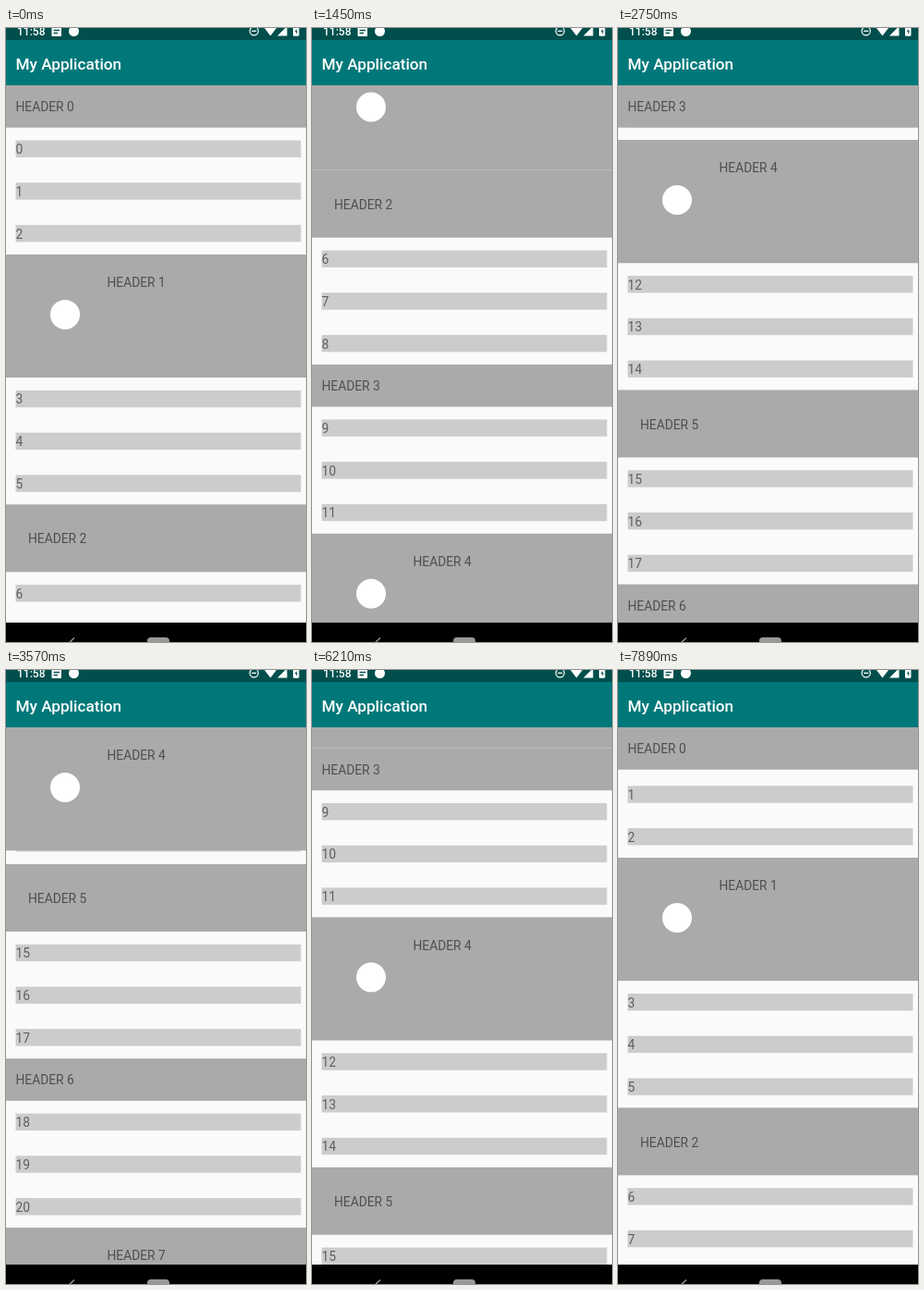
Write an HTML page that moves like this. It is 325 px wide and 664 px high and loops after 8000 ms.

```html
<!DOCTYPE html>
<html lang="en">
<head>
<meta charset="utf-8">
<title>Sticky header list</title>
<style>
  html, body { margin: 0; width: 100%; height: 100%; overflow: hidden; background: #fafafa; }
  svg { display: block; width: 100vw; height: 100vh; }
  text { font-family: Roboto, "Noto Sans", sans-serif; font-size: 13.8px; fill: #000; fill-opacity: .54; }
  .bar { font-weight: 500; fill: #fff; fill-opacity: 1; }
</style>
</head>
<body>
<svg viewBox="0 0 325 664">
  <rect width="325" height="664" fill="#fafafa"/>
  <g id="items"></g>
  <g id="headers"></g>

  <rect width="325" height="62" fill="#00787a"/>
  <rect width="325" height="13" fill="#004f4c"/>
  <text class="bar" x="10.5" y="44.5" style="font-size:17.2px">My Application</text>

  <g fill="#fff">
    <text class="bar" x="12" y="8" style="font-size:12px">11:58</text>
    <rect x="49.5" y="-2" width="10.5" height="11" rx="1"/>
    <path d="M51.5 2.5h6.5M51.5 5.5h4.5" stroke="#004f4c" stroke-width="1.3"/>
    <circle cx="73.5" cy="3.5" r="5.5"/>
    <circle cx="268.7" cy="3.3" r="4.6" fill="none" stroke="#fff" stroke-width="1.2"/>
    <path d="M266.2 3.3h5" stroke="#fff" stroke-width="1.3"/>
    <path d="M280 0h13l-6.5 8.5zM294 8.5L304.5 -2V8.5z"/>
    <rect x="311" y="-3" width="6.5" height="11.8" rx="1"/>
    <path d="M314.8 1l-2 3h1.4v2.6l2-3.2h-1.4z" fill="#004f4c"/>
  </g>

  <rect y="643" width="325" height="21" fill="#000"/>
  <path d="M74 659.5L67 666" stroke="#999" stroke-width="1.4"/>
  <rect x="153" y="659" width="24" height="12" rx="4" fill="#999"/>
</svg>
<script>
const LOOP = 8000, TOP = 62, ROW = 45.73, ROWS_PER_SECTION = 3;

const KINDS = [
  { height: 45.7, textX: 10.5, baseline: 28.3 },
  { height: 133.2, textX: 109.5, baseline: 35.2, icon: true },
  { height: 73, textX: 24, baseline: 42.2 },
];

// Screen updates: [first, last, count]
const BURSTS = [
  [500, 1450, 8], [1610, 2610, 8], [2750, 3570, 7],
  [5250, 6210, 8], [6380, 7290, 7], [7440, 7890, 4],
];
const TICKS = BURSTS.flatMap(([first, last, count]) =>
  Array.from({ length: count }, (_, i) =>
    Math.round(first + i * (last - first) / (count - 1))));

// Scroll keys: [time, offset, speed in px/ms]
const KEYS = [
  [360, 0, .15], [907, 136.4, .33], [1896, 543, .33], [3570, 968.8, .2],
  [5110, 968.8, -.2], [5250, 935.8, -.26], [6210, 641, -.34], [7890, 41.9, -.35],
];

const itemLayer = document.getElementById('items');
const headerLayer = document.getElementById('headers');

function add(parent, tag, attrs, content) {
  const el = document.createElementNS('http://www.w3.org/2000/svg', tag);
  for (const name in attrs) el.setAttribute(name, attrs[name]);
  if (content !== undefined) el.textContent = content;
  return parent.appendChild(el);
}

const moveTo = (el, y) => el.setAttribute('transform', `translate(0 ${y.toFixed(2)})`);

function buildList() {
  const headers = [];
  let y = 0;
  for (let section = 0; section < 9; section++) {
    const kind = KINDS[section % 3];
    const el = add(headerLayer, 'g', {});
    add(el, 'rect', { width: 325, height: kind.height, fill: '#aaa' });
    add(el, 'text', { x: kind.textX, y: kind.baseline }, 'HEADER ' + section);
    if (kind.icon) add(el, 'circle', { cx: 64, cy: 65, r: 16, fill: '#fff' });
    headers.push({ el, y, height: kind.height });
    y += kind.height;
    for (let row = 0; row < ROWS_PER_SECTION; row++, y += ROW) {
      add(itemLayer, 'rect', { x: 10.5, y: y + 13.8, width: 309, height: 18.4, fill: '#ccc' });
      add(itemLayer, 'text', { x: 10.5, y: y + 28.4 }, section * ROWS_PER_SECTION + row);
    }
  }
  return headers;
}

function scrollAt(time) {
  const i = KEYS.findIndex(key => key[0] >= time);
  if (i < 1) return 0;
  const [t0, p0, v0] = KEYS[i - 1], [t1, p1, v1] = KEYS[i];
  const span = t1 - t0, u = (time - t0) / span, w = 1 - u;
  return p0 * w * w * (1 + 2 * u) + v0 * span * u * w * w
       + p1 * u * u * (3 - 2 * u) - v1 * span * u * u * w;
}

const headers = buildList();

function render(time) {
  const tick = TICKS.filter(t => t <= time).pop() ?? 0;
  const scroll = scrollAt(tick);
  moveTo(itemLayer, TOP - scroll);
  headers.forEach((header, i) => {
    // Pinned at the top until the next header pushes it away
    const next = headers[i + 1];
    const pinned = next ? Math.min(0, next.y - scroll - header.height) : 0;
    moveTo(header.el, TOP + Math.max(header.y - scroll, pinned));
  });
}

function loop() {
  render(performance.now() % LOOP);
  requestAnimationFrame(loop);
}
loop();
</script>
</body>
</html>
```
